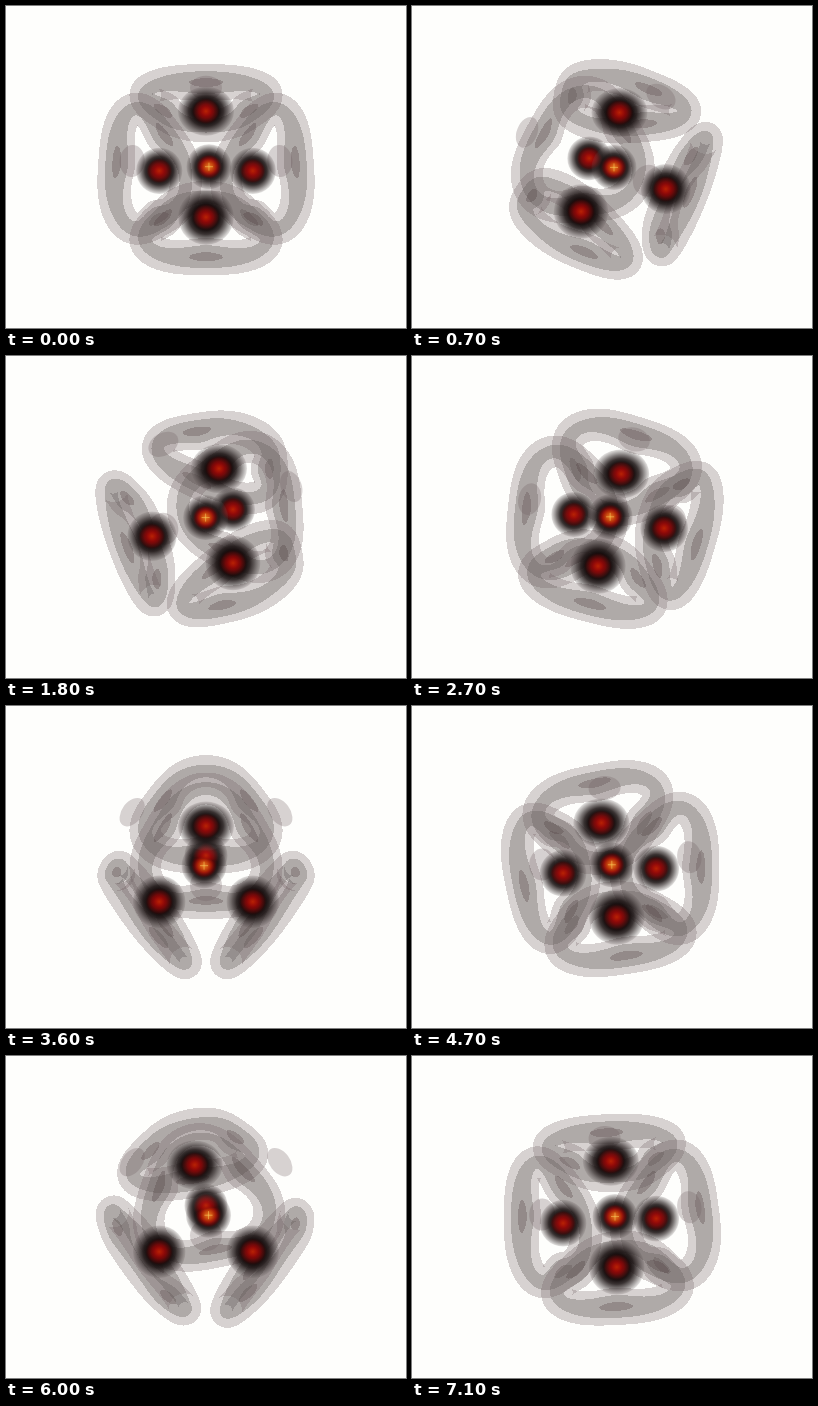
Recreate the animation shown at these times as an HTML page with a canvas. Size 400 by 322 pixels, loop 7.2 s.

```html
<!DOCTYPE html>
<html lang="en">
<head>
<meta charset="utf-8">
<title>Rotating density</title>
<style>
  html, body { margin: 0; width: 100%; height: 100%; overflow: hidden; background: #fefefc; }
  canvas { display: block; }
</style>
</head>
<body>
<canvas id="stage" width="400" height="322"></canvas>
<script>
const ctx = document.getElementById('stage').getContext('2d');
const LOOP = 7200, STEP = 100, STEPS = LOOP / STEP;
const CX = 200, CY = 161;
const TILT_COS = 0.82, TILT_SIN = 0.572;
const BOX = { x: 80, y: 40, w: 240, h: 246 };
const BACKGROUND = [254, 254, 252];

// Atoms turn around a vertical axis; angle 0 points away from the viewer.
const ATOMS = [
  { radius: 13, height: 59, angle: 0, ringDistance: 71, opposite: 2 },
  { radius: 54, height: -23.5, angle: -60, ringDistance: 75, opposite: 0 },
  { radius: 54, height: -23.5, angle: 180, ringDistance: 75, opposite: 0 },
  { radius: 54, height: -23.5, angle: 60, ringDistance: 75, opposite: 0 }
];
const CORE = { radius: 2.6, height: 1, angle: 110 };

// Each ring is a rounded triangle, thicker along its sides than at its corners.
const RING = 57, WOBBLE = 8, LOBE = 45, REACH = 86, SLAB = 20;
// Nested translucent surfaces, from the outside in.
const LEVELS = [
  { limit: 300, color: [112, 94, 97], alpha: 0.15 },
  { limit: 85, color: [98, 93, 90], alpha: 0.19 },
  { limit: -25, color: [66, 48, 49], alpha: 0.16 }
];
// Flattened blobs opposite the three lower atoms.
const CAP = { distance: 93, thick: 10, wide: 16, fill: 'rgba(112,94,97,.28)' };

const dot = (a, b) => a[0] * b[0] + a[1] * b[1] + a[2] * b[2];
const scale = (a, k) => a.map(v => v * k);
const unit = a => scale(a, 1 / Math.hypot(...a));
const cross = (a, b) => [
  a[1] * b[2] - a[2] * b[1],
  a[2] * b[0] - a[0] * b[2],
  a[0] * b[1] - a[1] * b[0]
];

// Returns screen offsets x, y and the depth toward the viewer.
function place({ radius, height, angle }, turn) {
  const a = (angle + turn) * Math.PI / 180;
  const x = radius * Math.sin(a), back = radius * Math.cos(a);
  return [
    x,
    -(height * TILT_COS + back * TILT_SIN),
    height * TILT_SIN - back * TILT_COS
  ];
}

function makeRing(atom, points, i) {
  const n = unit(points[i]);
  const other = unit(points[atom.opposite]);
  const k = dot(other, n);
  const u = unit(other.map((v, j) => k * n[j] - v));
  return { n, u, v: cross(n, u), center: scale(n, atom.ringDistance) };
}

function levelAt(u, v, w) {
  const r2 = u * u + v * v, r = Math.sqrt(r2) || 1;
  const lobes = u * (u * u - 3 * v * v) / (r2 * r || 1);
  const d = r - RING + WOBBLE * lobes;
  const field = d * d + w * w - LOBE * lobes;
  if (field > LEVELS[0].limit) return 0;
  if (field > LEVELS[1].limit) return 1;
  return field > LEVELS[2].limit ? 2 : 3;
}

function blend(color, level) {
  const { color: tint, alpha } = LEVELS[level];
  for (let i = 0; i < 3; i++) color[i] += (tint[i] - color[i]) * alpha;
}

// Walks one view ray through a ring and tints at each surface crossed.
function traceRing({ n, u, v, center }, x, y, color) {
  const px = x - center[0], py = y - center[1];
  const span = REACH * REACH - px * px - py * py;
  if (span <= 0) return;
  let near = -Math.sqrt(span), far = -near;
  const w0 = px * n[0] + py * n[1];
  if (Math.abs(n[2]) > 0.001) {
    const a = (-SLAB - w0) / n[2], b = (SLAB - w0) / n[2];
    near = Math.max(near, Math.min(a, b));
    far = Math.min(far, Math.max(a, b));
  } else if (Math.abs(w0) > SLAB) return;
  const u0 = px * u[0] + py * u[1], v0 = px * v[0] + py * v[1];
  let level = 0;
  for (let z = near; z < far + 2; z += 2) {
    const next = z < far
      ? levelAt(u0 + u[2] * z, v0 + v[2] * z, w0 + n[2] * z)
      : 0;
    while (level < next) blend(color, level++);
    while (level > next) blend(color, --level);
  }
}

function drawRings(rings) {
  const image = ctx.createImageData(BOX.w, BOX.h);
  const color = [0, 0, 0];
  for (let j = 0, p = 0; j < BOX.h; j++) {
    for (let i = 0; i < BOX.w; i++, p += 4) {
      for (let k = 0; k < 3; k++) color[k] = BACKGROUND[k];
      const x = BOX.x + i + 0.5 - CX, y = BOX.y + j + 0.5 - CY;
      for (const ring of rings) traceRing(ring, x, y, color);
      for (let k = 0; k < 3; k++) image.data[p + k] = color[k];
      image.data[p + 3] = 255;
    }
  }
  ctx.putImageData(image, BOX.x, BOX.y);
}

function drawCap(point) {
  const n = unit(point);
  const along = Math.hypot(CAP.thick * Math.hypot(n[0], n[1]), CAP.wide * n[2]);
  ctx.fillStyle = CAP.fill;
  ctx.beginPath();
  ctx.ellipse(
    CX - n[0] * CAP.distance, CY - n[1] * CAP.distance,
    along, CAP.wide, Math.atan2(n[1], n[0]), 0, 7
  );
  ctx.fill();
}

function disc(x, y, rx, ry, stops) {
  ctx.save();
  ctx.translate(x, y);
  ctx.scale(rx, ry);
  const fill = ctx.createRadialGradient(0, 0, 0, 0, 0, 1);
  for (const [at, color] of stops) fill.addColorStop(at, color);
  ctx.fillStyle = fill;
  ctx.beginPath();
  ctx.arc(0, 0, 1, 0, 7);
  ctx.fill();
  ctx.restore();
}

const HALO = [
  [0, 'rgba(12,4,4,1)'], [0.46, 'rgba(16,8,8,.97)'], [0.62, 'rgba(26,18,18,.86)'],
  [0.77, 'rgba(44,36,36,.62)'], [0.9, 'rgba(66,58,58,.37)'], [1, 'rgba(90,80,80,.16)']
];
const RED_GLOW = [
  [0, 'rgba(184,34,6,1)'], [0.25, 'rgba(156,14,0,1)'], [0.5, 'rgba(114,4,0,1)'],
  [0.75, 'rgba(64,0,0,.85)'], [1, 'rgba(26,0,0,0)']
];
const ORANGE_GLOW = [
  [0, 'rgba(228,124,36,1)'], [0.25, 'rgba(204,78,16,1)'], [0.5, 'rgba(158,24,4,1)'],
  [0.75, 'rgba(80,4,0,.85)'], [1, 'rgba(26,0,0,0)']
];

function drawAtoms(points, core) {
  const blobs = points.map(([x, y, z], i) => {
    const r = 25.6 + z * 0.07;
    return { x: CX + x, y: CY + y, z, rx: i ? r : 28, ry: i ? r : 24.5, glow: 15 };
  });
  const heart = { x: CX + 0.5 + core[0], y: CY + core[1], z: 0, rx: 22.5, ry: 22.5, glow: 14.5 };
  const all = [...blobs, heart].sort((a, b) => a.z - b.z);
  for (const b of all) disc(b.x, b.y, b.rx, b.ry, HALO);

  ctx.globalCompositeOperation = 'lighten';
  for (const b of all) {
    disc(b.x, b.y, b.glow, b.glow * 0.95, b === heart ? ORANGE_GLOW : RED_GLOW);
  }
  ctx.globalCompositeOperation = 'source-over';

  ctx.strokeStyle = 'rgba(246,196,88,.6)';
  ctx.lineWidth = 1;
  ctx.beginPath();
  ctx.moveTo(heart.x - 4, heart.y);
  ctx.lineTo(heart.x + 4, heart.y);
  ctx.moveTo(heart.x, heart.y - 4);
  ctx.lineTo(heart.x, heart.y + 4);
  ctx.stroke();
}

function draw(step) {
  const turn = step * 360 / STEPS;
  const points = ATOMS.map(atom => place(atom, turn));
  ctx.fillStyle = `rgb(${BACKGROUND})`;
  ctx.fillRect(0, 0, 400, 322);
  drawRings(ATOMS.map((atom, i) => makeRing(atom, points, i)));
  points.slice(1).forEach(drawCap);
  drawAtoms(points, place(CORE, turn));
}

let shown = -1;
function tick() {
  const step = Math.floor(performance.now() % LOOP / STEP);
  if (step !== shown) draw(shown = step);
  requestAnimationFrame(tick);
}
tick();
</script>
</body>
</html>
```
